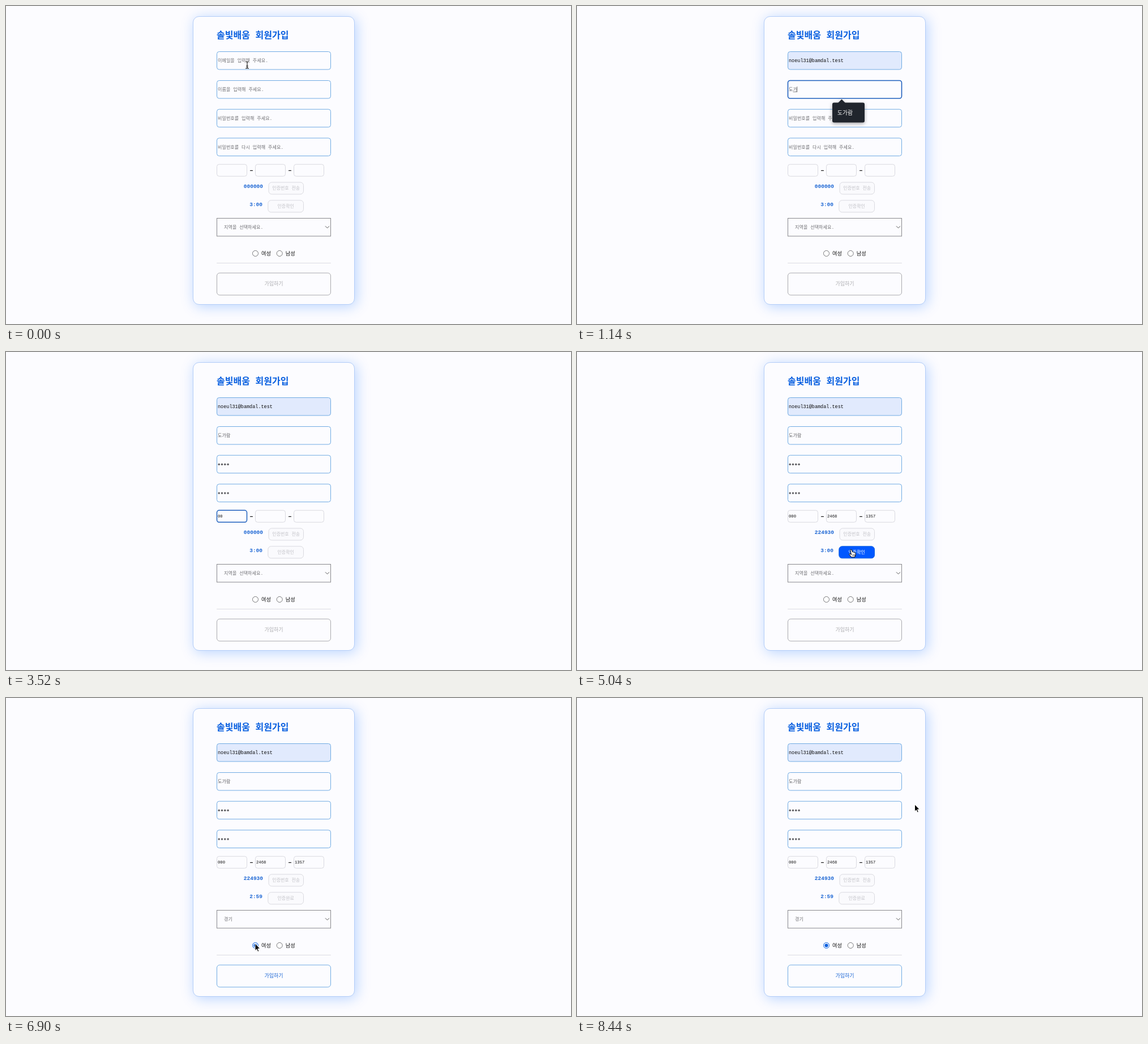
These frames come from a looping animation (998x561 px, 8600 ms). An HTML page:

```html
<!DOCTYPE html>
<html lang="ko">
<head>
<meta charset="utf-8">
<title>회원가입</title>
<style>
  html, body { margin: 0; width: 100%; height: 100%; overflow: hidden; background: #fcfcff; }
  #card {
    position: absolute; left: 329.5px; top: 17.5px; width: 286px; height: 509px;
    box-sizing: border-box; border: 1px solid #b3cdf8; border-radius: 11px;
    background: #fcfcff; box-shadow: 3px 3px 23px rgba(0, 104, 255, .27);
  }
  svg { position: absolute; left: 0; top: 0; }
  text { font-family: "Liberation Mono", "Noto Sans CJK KR", "Noto Sans CJK JP", monospace; }
  .sans { font-family: "Noto Sans CJK KR", "Noto Sans CJK JP", sans-serif; }
  .float { filter: drop-shadow(0 2px 3px rgba(0, 0, 0, .35)); }
</style>
</head>
<body>
<div id="card"></div>
<svg id="stage" width="998" height="561" viewBox="0 0 998 561"></svg>
<script>
const LOOP = 8600;
const BLUE = '#0a60e0', GREY = '#707074', PALE = '#dadae0', EDGE = '#70abe3';
const EMAIL = 'noeul31@bamdal.test', NAME = '도가람', PHONE = ['000', '2468', '1357'];
const stage = document.getElementById('stage');

const rect = (x, y, w, h, r, stroke, fill = 'none', width = 1) =>
  `<rect x="${x}" y="${y}" width="${w}" height="${h}" rx="${r}" fill="${fill}" stroke="${stroke}" stroke-width="${width}"/>`;
const text = (x, y, str, size, fill, extra = '') =>
  `<text x="${x}" y="${y}" font-size="${size}" fill="${fill}" ${extra}>${str}</text>`;
const path = (d, stroke, width = 1, fill = 'none') =>
  `<path d="${d}" fill="${fill}" stroke="${stroke}" stroke-width="${width}" stroke-linejoin="round" stroke-linecap="round"/>`;
const circle = (x, y, r, fill, stroke = 'none') =>
  `<circle cx="${x}" cy="${y}" r="${r}" fill="${fill}" stroke="${stroke}"/>`;

const MIDDLE = 'text-anchor="middle"', BOLD = 'font-weight="700"', MEDIUM = 'font-weight="500"';
const within = (t, from, to) => t >= from && t < to;
// Number of characters typed, one every `step` ms after `start`.
const typed = (t, start, step, max) => Math.max(0, Math.min(max, Math.floor((t - start) / step) + 1));

function field(y, focused, content, fill = 'none') {
  return rect(372.5, y, 201, 31.5, 4, focused ? '#1e5fbd' : EDGE, fill, focused ? 1.6 : 1) + content;
}

const hint = (y, str) => text(374, y + 18.5, str, 8.1, GREY);

function dots(y, count) {
  let out = '';
  for (let i = 0; i < count; i++) out += circle(376.2 + i * 5.3, y + 16, 1.7, '#5c5c60');
  return out;
}

function suggestion(y, str) {
  const w = str === NAME ? 57 : 128;
  return `<g class="float">${rect(451, y + 39.5, w, 35, 3, 'none', '#20252d')}` +
    path(`M461 ${y + 40}l6.5 -6.5 6.5 6.5z`, 'none', 0, '#20252d') + '</g>' +
    text(460, y + 60.5, str, 9.8, '#fff', 'class="sans"');
}

function button(x, y, w, label, active) {
  return rect(x, y, w, 21, 5.5, active ? BLUE : PALE, active ? '#0058ff' : '#fafafd') +
    text(x + w / 2, y + 13.3, label, 8, active ? '#fff' : '#c2c2c8', MIDDLE + (active ? MEDIUM : ''));
}

function radio(x, label, checked) {
  return circle(x, 436.5, 5, '#fff', checked ? BLUE : '#76767a') +
    (checked ? circle(x, 436.5, 3.1, BLUE) : '') +
    text(x + 10.5, 440, label, 9.2, '#111', MEDIUM);
}

function menu(hover) {
  let out = `<g class="float">${rect(365.5, 379.5, 202.5, 68.5, 4.5, '#858585', '#555555')}</g>`;
  if (hover) out += rect(369, 414, 195, 14, 3, 'none', '#2a66cf');
  out += path('M374 392.5l2 2.5 4 -6', '#aaa', 1.2);
  ['지역을 선택하세요', '서울', '경기', '인천'].forEach((label, i) => {
    out += text(385, 393.8 + i * 15, label, 7.4, i ? '#fff' : '#9c9c9c', 'class="sans"' + (i ? BOLD : ''));
  });
  return out;
}

const cursors = {
  beam: path('M-2.5 -6Q0 -6 0 -4Q0 -6 2.5 -6M0 -4V4M-2.5 6Q0 6 0 4Q0 6 2.5 6M-1.5 2H1.5', '#fff', 2.4) +
    path('M-2.5 -6Q0 -6 0 -4Q0 -6 2.5 -6M0 -4V4M-2.5 6Q0 6 0 4Q0 6 2.5 6M-1.5 2H1.5', '#111', 1.1),
  arrow: path('M0 0V12.2L2.8 9.6L4.8 14L6.8 13.1L4.9 8.8H8.6Z', '#fff', 1, '#000'),
  hand: path('M-3 -6Q-1.8 -7.4 -.8 -6L.6 -2Q2 -3 2.8 -1.6Q4.4 -2 4.8 -.6Q6.4 -.6 6.2 1L5.8 4L4.6 7H-1.2L-5 2.4Q-5.4 .6 -3.6 1L-1.8 2.4Z', '#000', 1, '#fff') +
    path('M.9 2V5M2.7 2V5M4.4 2V5', '#000', .6)
};

// time, x, y
const route = [
  [0, 426, 104], [4380, 548, 302], [4600, 497, 324], [4720, 497, 324], [5020, 486, 355],
  [5180, 486, 355], [5420, 740, 90], [5560, 740, 90], [5900, 442, 389.5], [6080, 442, 389.5],
  [6320, 418, 421], [6460, 418, 421], [6820, 440, 433.5], [6920, 440, 433.5], [7120, 482, 492],
  [7240, 482, 492], [7480, 740, 90], [7640, 740, 90], [8420, 596.5, 188], [LOOP, 596.5, 188]
];

function pointer(t) {
  if (within(t, 300, 4380)) return '';
  let x = 426, y = 104;
  if (t >= 4380) {
    const i = route.findIndex(p => p[0] > t);
    const [t0, x0, y0] = route[i - 1], [t1, x1, y1] = route[i];
    const k = (t - t0) / (t1 - t0), ease = k * k * (3 - 2 * k);
    x = x0 + (x1 - x0) * ease;
    y = y0 + (y1 - y0) * ease;
  }
  const overButton = within(t, 4540, 5230) || within(t, 7060, 7270);
  const kind = t < 300 ? 'beam' : overButton ? 'hand' : 'arrow';
  return `<g transform="translate(${x.toFixed(1)} ${y.toFixed(1)})">${cursors[kind]}</g>`;
}

function scene(t) {
  const verified = t >= 5600, sent = t >= 4640;
  const emailChars = t >= 720 ? EMAIL.length : typed(t, 320, 130, 3);
  const nameChars = typed(t, 1040, 100, 2) + (t >= 1360);
  const pass = typed(t, 1880, 100, 4), again = typed(t, 2800, 120, 4);
  let out = text(372, 57, '솔빛배움 회원가입', 16, BLUE, BOLD);

  out += field(80.5, within(t, 180, 900), emailChars
    ? text(374, 99.3, EMAIL.slice(0, emailChars), 8.5, '#111') : hint(80.5, '이메일을 입력해 주세요.'),
    t >= 720 ? '#e1eafd' : 'none');
  out += field(131.5, within(t, 900, 1760), nameChars
    ? text(374, 149.8, NAME.slice(0, nameChars), 8.1, '#606064') : hint(131.5, '이름을 입력해 주세요.'));
  if (within(t, 1040, 1600)) {
    const end = 374 + nameChars * 7.45;
    out += path(`M${end - 7} 151.5H${end}V142.5`, '#555', .7);
  }
  out += field(182.2, within(t, 1760, 2620), pass ? dots(182.2, pass) : hint(182.2, '비밀번호를 입력해 주세요.'));
  out += field(233, within(t, 2620, 3400), again ? dots(233, again) : hint(233, '비밀번호를 다시 입력해 주세요.'));

  PHONE.forEach((part, i) => {
    const x = 372.5 + i * 68, start = 3460 + i * 260;
    const focused = within(t, start - 60, i < 2 ? start + 200 : 4400);
    out += rect(x, 279.3, 53, 21, 4, focused ? '#1e5fbd' : PALE, 'none', focused ? 1.5 : 1) +
      text(x + 1.5, 292.3, part.slice(0, typed(t, start, 60, part.length)), 7.2, '#111');
    if (i < 2) out += path(`M${x + 59} 290.3h4`, '#222', 1.2);
  });

  out += text(454, 321.3, sent ? '224930' : '000000', 9.5, '#1c66d4', 'text-anchor="end"' + BOLD);
  out += text(453, 353.3, verified ? '2:59' : '3:00', 9.5, '#1c66d4', 'text-anchor="end"' + BOLD);
  out += button(464, 311, 61.5, '인증번호 전송', within(t, 4260, 4640));
  out += button(462.8, 342.8, 62.7, verified ? '인증완료' : '인증확인', sent && !verified);

  out += rect(372.5, 374.5, 201, 31.5, 0, '#88888c') +
    text(385, 393, t >= 6460 ? '경기' : '지역을 선택하세요.', 8.1, GREY) +
    path('M564.3 388.6l3.2 3.2 3.2 -3.2', '#555', 1);
  out += radio(440.5, '여성', t >= 6840) + radio(483.2, '남성', false);
  out += path('M372.5 453.5H573.5', '#dcdce2');
  out += rect(372.5, 471, 201, 39, 5, verified ? EDGE : '#a9a9ad') +
    text(473, 493.3, '가입하기', 9, verified ? '#1c66d4' : '#adadb1', MIDDLE + (verified ? MEDIUM : ''));

  if (within(t, 320, 720)) out += suggestion(80.5, EMAIL);
  if (within(t, 1040, 1600)) out += suggestion(131, NAME);
  if (within(t, 5940, 6460)) out += menu(t >= 6240);
  return out + pointer(t);
}

let shown = '';
function frame() {
  const next = scene(performance.now() % LOOP);
  if (next !== shown) stage.innerHTML = shown = next;
  requestAnimationFrame(frame);
}
frame();
</script>
</body>
</html>
```
